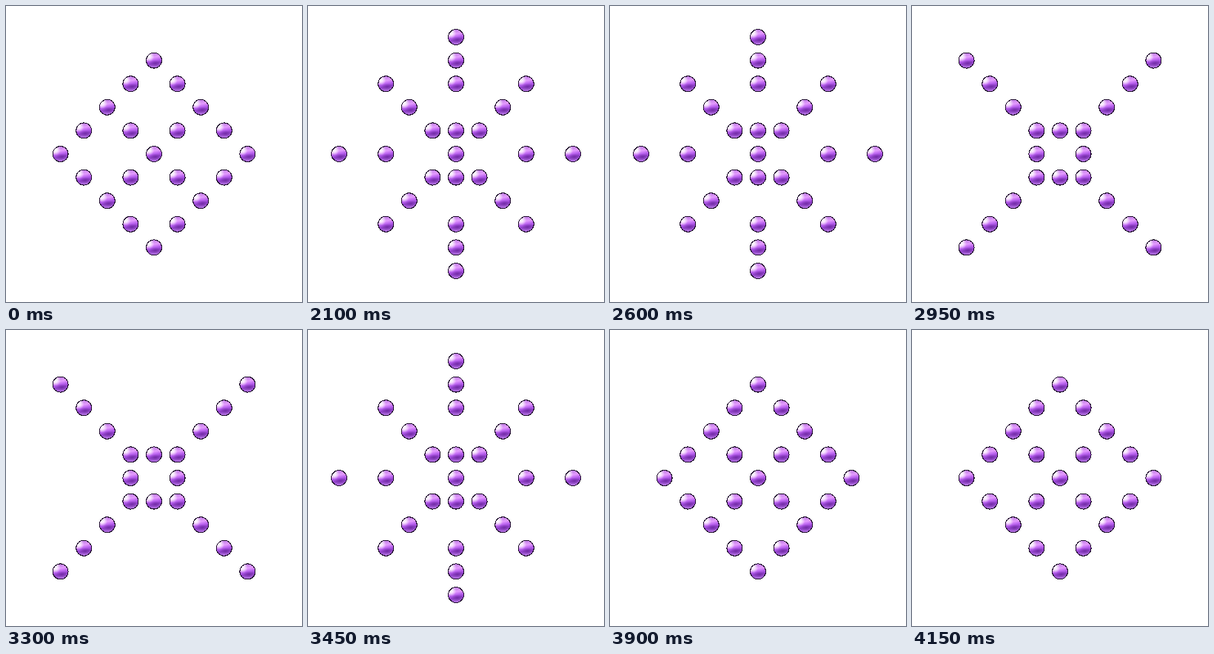
Write an HTML page that moves like this. It is 400 by 400 pixels and loops after 4.3 s.

```html
<!DOCTYPE html>
<html lang="en">
<head>
<meta charset="utf-8">
<title>Dancing balls</title>
<style>
html, body { margin: 0; width: 100%; height: 100%; overflow: hidden; background: #fff; }
svg { display: block; width: 100%; height: 100%; }
</style>
</head>
<body>
<svg id="stage" viewBox="0 0 400 400">
  <defs>
    <linearGradient id="body" x1=".4" y1="0" x2=".6" y2="1">
      <stop offset="0" stop-color="#b978de"/>
      <stop offset=".3" stop-color="#e59cff"/>
      <stop offset=".5" stop-color="#b860ee"/>
      <stop offset=".68" stop-color="#8f40c8"/>
      <stop offset="1" stop-color="#bd80e8"/>
    </linearGradient>
    <radialGradient id="shade">
      <stop offset="0" stop-color="#6c269f" stop-opacity=".8"/>
      <stop offset="1" stop-color="#6c269f" stop-opacity="0"/>
    </radialGradient>
    <radialGradient id="shine">
      <stop offset="0" stop-color="#fff"/>
      <stop offset=".35" stop-color="#fff" stop-opacity=".8"/>
      <stop offset="1" stop-color="#fff" stop-opacity="0"/>
    </radialGradient>
    <clipPath id="disc"><circle r="10.5"/></clipPath>
    <g id="ball">
      <circle r="10.5" fill="url(#body)"/>
      <g clip-path="url(#disc)">
        <ellipse cx="2" cy="4" rx="8" ry="4.5" fill="url(#shade)"/>
        <circle cx="-7" cy="-5.5" r="7.5" fill="url(#shine)"/>
      </g>
      <circle r="10.5" fill="none" stroke="#1d0b2a" shape-rendering="crispEdges"/>
    </g>
  </defs>
</svg>
<script>
const LOOP = 4300, CENTRE = 200, STEP = 31.6;
const stage = document.getElementById('stage');
const SVG = 'http://www.w3.org/2000/svg';

// Grid points of one quadrant, mirrored across both axes.
const shapes = {
  diamond: [[0, 0], [1, 1], [0, 4], [1, 3], [2, 2], [3, 1], [4, 0]],
  star: [[0, 0], [0, 1], [1, 1], [2, 2], [3, 3], [0, 3], [0, 4], [0, 5], [3, 0], [5, 0]],
  cross: [[0, 1], [1, 0], [1, 1], [2, 2], [3, 3], [4, 4]]
};

const steps = [
  [0, 'diamond'],
  [2100, 'star'], [2200, 'cross'], [2300, 'star'], [2350, 'diamond'],
  [2500, 'star'], [2550, 'cross'], [2600, 'star'], [2700, 'diamond'],
  [2850, 'star'], [2900, 'diamond'], [2950, 'cross'],
  [3100, 'star'], [3150, 'diamond'], [3200, 'star'], [3300, 'cross'],
  [3450, 'star'], [3500, 'diamond'], [3600, 'star'], [3700, 'cross'],
  [3800, 'star'], [3900, 'diamond'],
  [4000, 'star'], [4100, 'cross'], [4150, 'diamond']
];

function mirror(points) {
  const spots = new Map();
  for (const [x, y] of points)
    for (const sx of [-1, 1])
      for (const sy of [-1, 1])
        spots.set(`${x * sx},${y * sy}`, [x * sx, y * sy]);
  return [...spots.values()];
}

function build(points) {
  const group = document.createElementNS(SVG, 'g');
  for (const [x, y] of mirror(points)) {
    const ball = document.createElementNS(SVG, 'use');
    ball.setAttribute('href', '#ball');
    ball.setAttribute('x', CENTRE + x * STEP);
    ball.setAttribute('y', CENTRE + y * STEP);
    group.append(ball);
  }
  stage.append(group);
  return group;
}

const groups = {};
for (const name in shapes) groups[name] = build(shapes[name]);

const start = performance.now();

function draw() {
  const time = (performance.now() - start) % LOOP;
  const current = steps.filter(([at]) => at <= time).pop()[1];
  for (const name in groups)
    groups[name].style.display = name === current ? '' : 'none';
  requestAnimationFrame(draw);
}
draw();
</script>
</body>
</html>
```
